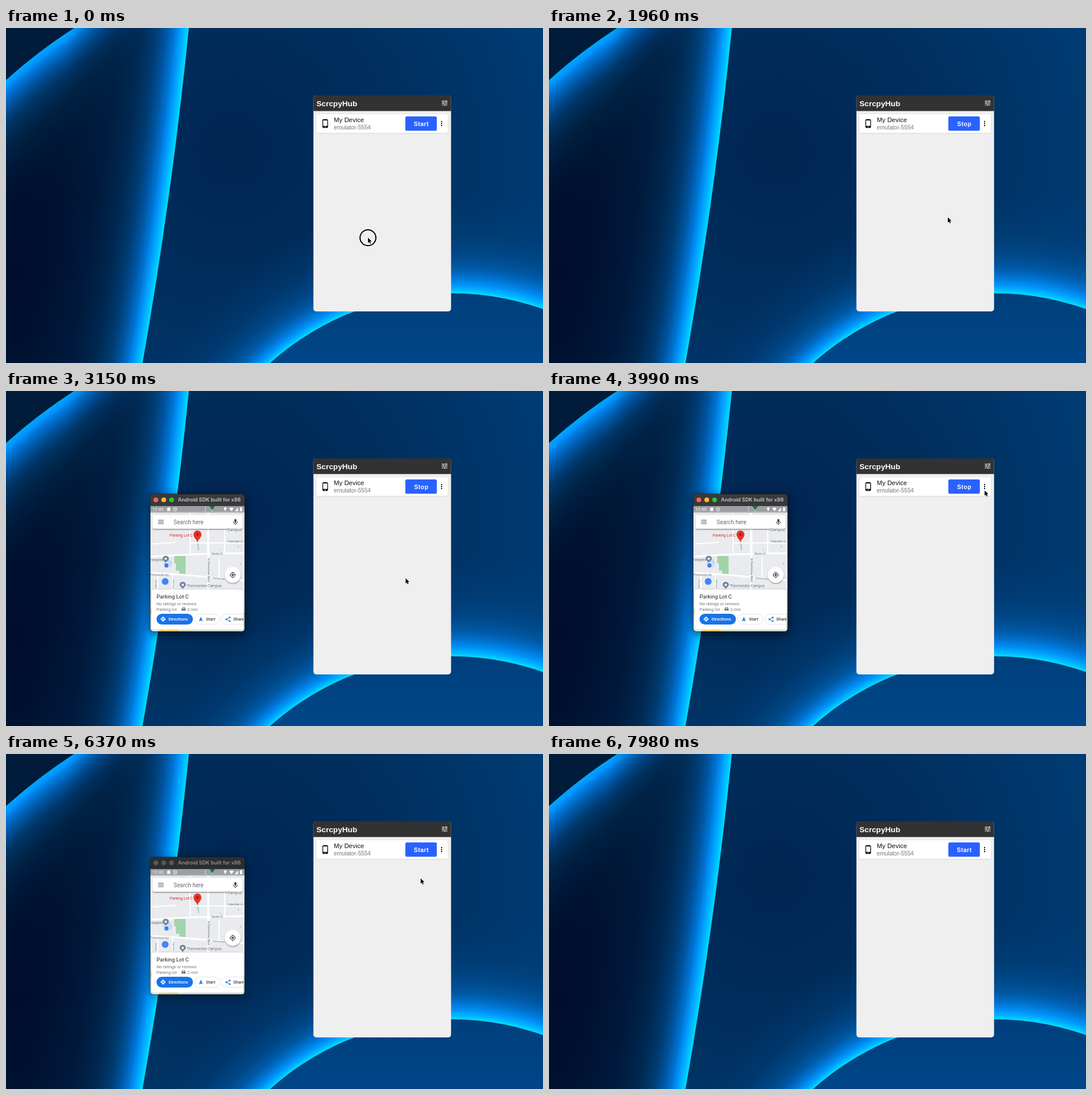
These frames come from a looping animation (948x591 px, 8.54 s). An HTML page:

```html
<!DOCTYPE html>
<html lang="en">
<head>
<meta charset="utf-8">
<title>ScrcpyHub</title>
<style>
html, body { margin: 0; width: 100%; height: 100%; overflow: hidden; background: #002a55; }
svg { display: block; width: 100%; height: 100%; }
.ui { font-family: "Liberation Sans", Arial, sans-serif; }
.map { font-family: Roboto, sans-serif; }
.label { paint-order: stroke; stroke: #f3f4f5; stroke-width: 1.2px; fill: #5f6b75; }
</style>
</head>
<body>
<svg viewBox="0 0 948 591" preserveAspectRatio="none">
  <defs>
    <radialGradient id="sky" gradientUnits="userSpaceOnUse" cx="400" cy="215" r="640">
      <stop offset="0" stop-color="#002552"/><stop offset=".45" stop-color="#002f5e"/><stop offset="1" stop-color="#003e78"/>
    </radialGradient>
    <radialGradient id="leaf" gradientUnits="userSpaceOnUse" cx="20" cy="430" r="440">
      <stop offset="0" stop-color="#000e2e"/><stop offset=".4" stop-color="#001231"/><stop offset="1" stop-color="#00223f"/>
    </radialGradient>
    <linearGradient id="dome" x1="0" y1="0" x2="0" y2="1">
      <stop offset="0" stop-color="#003f7c"/><stop offset=".15" stop-color="#00478a"/>
    </linearGradient>
    <clipPath id="leafClip"><circle cx="-7731.6" cy="-813.7" r="8095.4"/></clipPath>
    <clipPath id="phoneClip"><rect x="255" y="182" width="166" height="242" rx="5"/></clipPath>
    <clipPath id="sheetClip"><rect x="257" y="350" width="162" height="71" rx="4"/></clipPath>
    <filter id="blur" x="-50%" y="-50%" width="200%" height="200%"><feGaussianBlur stdDeviation="9"/></filter>
    <filter id="soft" x="-20%" y="-50%" width="140%" height="200%"><feGaussianBlur stdDeviation="1"/></filter>
  </defs>

  <g id="wallpaper">
    <rect width="948" height="591" fill="url(#sky)"/>
    <g clip-path="url(#leafClip)">
      <rect width="340" height="591" fill="url(#leaf)"/>
      <circle id="rim" cx="637" cy="798" r="951"/>
      <path d="M0 0H330V591H0Z" id="edge"/>
      <path d="M0 0H120A951 951 0 0 0 0 91.500Z" fill="#001c3a"/>
    </g>
    <rect id="halo" y="250" x="250" width="698" height="341"/>
    <circle cx="787" cy="948" r="480" fill="url(#dome)"/>
  </g>

  <g id="phone">
    <rect id="shadow" x="255" y="186" width="166" height="242" rx="8" filter="url(#blur)"/>
    <rect x="254.5" y="181.5" width="167" height="243" rx="5.5" fill="#14181d"/>
    <g clip-path="url(#phoneClip)" class="map">
      <rect id="bar" x="255" y="182" width="166" height="21.5"/>
      <g id="lights"><circle cx="264.5" cy="192"/><circle cx="278.5" cy="192"/><circle cx="292.3" cy="192"/></g>
      <text id="caption" x="359" y="195.3" font-size="8.95" font-weight="700" text-anchor="middle" font-family="Inter, sans-serif">Android SDK built for x86</text>

      <rect x="255" y="203" width="166" height="221" fill="#e9ebee"/>
      <path d="M297 291H317V324H306V317H300V304H297Z" fill="#a3d3ab"/>
      <path d="M338 265L340 281" stroke="#a8d8b0" stroke-width="2.5"/>
      <g fill="none" stroke="#fff" stroke-width="2">
        <path d="M255 292L330 288L421 286" stroke-width="3"/>
        <path d="M255 321L310 324L421 334" stroke-width="3"/>
        <path d="M357 203V350" stroke-width="4"/>
        <path d="M325 213V290M325 268H421M386 244V286M255 270L300 267M294 325V350M268 325V350M376 292V330"/>
      </g>
      <path d="M379 282V280M410 276V273M414 306V303" stroke="#9aa0a6"/>

      <rect x="255" y="203" width="166" height="11" fill="#9b9fa3"/>
      <path d="M352 203V214H364V203M255 214H421" fill="none" stroke="#b8bcc0" stroke-width="2"/>
      <path d="M359 203H369L364 210Z" fill="#187544"/>
      <text x="258" y="211.3" font-size="8" fill="#fff">12:40</text>
      <g fill="#fff">
        <path d="M286 205.500H290V211.500H284.500V207Z"/>
        <circle cx="298.500" cy="208.500" r="3" fill="none" stroke="#fff"/><path d="M297 207L300 210" stroke="#fff"/>
        <path d="M387 212L384.800 208A2.300 2.300 0 1 1 389.200 208Z"/>
        <path d="M398 212L394 207Q398 203.800 402 207Z"/><path d="M404 212H409.500V205.500Z"/>
        <path d="M413 206H414V205H416V206H417V212H413Z"/>
      </g>
      <rect x="259" y="219.500" width="159" height="25" rx="3" fill="#0006" filter="url(#soft)"/>
      <rect x="258.500" y="218.500" width="159.500" height="24.500" rx="3" fill="#fff"/>
      <path d="M268.500 228H278.500M268.500 231H278.500M268.500 234H278.500" stroke="#444" stroke-width="1.200"/>
      <text x="296" y="234.500" font-size="10" fill="#666a6e">Search here</text>
      <rect x="403.200" y="225.800" width="3.600" height="6.600" rx="1.800" fill="#444"/>
      <path d="M401.300 230.500A3.700 3.700 0 0 0 408.700 230.500M405 234.200V236.500" fill="none" stroke="#444" stroke-width="1.100"/>

      <g class="label" font-size="6.800">
        <text x="391" y="247">Campus</text>
        <text x="254" y="300">rowplex</text>
        <text x="319" y="346">Thornwicke Campus</text>
        <g font-size="5">
          <text x="254" y="325.500" transform="rotate(2 254 325)">Thornwicke Rd</text>
          <text x="364" y="331.500" font-size="4.300" transform="rotate(4 364 331)">Thornwicke Rd</text>
          <text x="363" y="289" font-size="4.600">Birchin Ct</text>
          <text x="391" y="266.500" font-size="4.600">Oakendale Ln</text>
          <text transform="translate(355.500 295) rotate(90)" font-size="5.400">N Elmhollow Blvd</text>
          <text transform="translate(266 347) rotate(-90)" font-size="4">Alta Ave</text>
          <text transform="translate(297 347) rotate(-90)" font-size="4">Pine Ave</text>
        </g>
      </g>
      <text class="label" x="289" y="256.500" font-size="6.800" style="fill:#c5221f">Parking Lot C</text>
      <path d="M338 267C337 262 331 259 331 253A7 7 0 0 1 345 253C345 259 339 262 338 267Z" fill="#e53529"/>
      <circle cx="338" cy="253" r="2.500" fill="#a31d14"/>
      <g id="pins"></g>
      <circle cx="285.500" cy="304" r="8" fill="#4285f4" opacity=".18"/>
      <circle cx="283.300" cy="307.700" r="4.500" fill="#3b80f0" stroke="#fff" stroke-width="1.200"/>
      <circle cx="281" cy="336" r="6" fill="#4285f4"/>

      <circle cx="400.500" cy="326" r="14" fill="#0006" filter="url(#soft)"/>
      <circle cx="400.300" cy="324.500" r="14.200" fill="#fff"/>
      <g fill="none" stroke="#444" stroke-width="1.100">
        <circle cx="400.300" cy="324.500" r="3.900"/>
        <path d="M400.300 319V321M400.300 328V330M394.800 324.500H396.800M403.800 324.500H405.800"/>
      </g>
      <circle cx="400.300" cy="324.500" r="2" fill="#444"/>

      <path d="M255 384L258 387V398L255 392M268 424Q273 419 280 422L302 420L306 424Z" fill="#f3d06b"/>
      <path d="M306 422H421V424H306ZM419 392H421V420H419Z" fill="#c5e2ca"/>
      <rect x="257" y="350" width="162" height="71" rx="4" fill="#0004" filter="url(#soft)"/>
      <g clip-path="url(#sheetClip)">
        <rect x="257" y="350" width="162" height="71" fill="#fff"/>
        <text x="265.700" y="366.300" font-size="9.600" fill="#202124">Parking Lot C</text>
        <g font-size="7.500" fill="#70757a">
          <text x="265.700" y="377.500">No ratings or reviews</text>
          <text x="265.700" y="387.800">Parking lot ·</text>
          <text x="320" y="387.800">2 min</text>
          <path d="M310 388V384.500L311.300 381.500H315.700L317 384.500V388H315.500V387H311.500V388ZM311.500 384H315.500L314.900 382.500H312.100Z" fill-rule="evenodd"/>
        </g>
        <rect x="265.700" y="393" width="64.300" height="19" rx="9.500" fill="#1a73e8"/>
        <g fill="#fff" stroke="#dadce0" stroke-width=".8">
          <rect x="333" y="393.400" width="44.500" height="18.200" rx="9.100"/>
          <rect x="380.500" y="393.400" width="60" height="18.200" rx="9.100"/>
        </g>
        <path d="M277.300 397.700L282 402.400L277.300 407.100L272.600 402.400Z" fill="#fff"/>
        <path d="M275.700 404.500V402H278.500M277.500 400.500L279.200 402L277.500 403.500" stroke="#1a73e8" fill="none"/>
        <path d="M344 398L347.500 406.500L344 405L340.500 406.500Z" fill="#3b78e7"/>
        <path d="M395 399.500L389 402.700L395 406" fill="none" stroke="#1a73e8"/>
        <g fill="#1a73e8"><circle cx="395" cy="399.400" r="1.500"/><circle cx="389" cy="402.700" r="1.500"/><circle cx="395" cy="406" r="1.500"/></g>
        <g font-size="7.500" font-weight="500" fill="#3c4043">
          <text x="287" y="405" fill="#fff">Directions</text>
          <text x="353" y="405">Start</text>
          <text x="401" y="405">Share</text>
        </g>
      </g>
    </g>
  </g>

  <g id="hub" class="ui">
    <rect x="542.700" y="119" width="243" height="381" rx="5" fill="#efefef"/>
    <path d="M542.700 146.500V124A5 5 0 0 1 547.700 119H780.700A5 5 0 0 1 785.700 124V146.500Z" fill="#323232"/>
    <text x="548" y="138" font-size="13.650" font-weight="700" fill="#fff">ScrcpyHub</text>
    <path transform="translate(767.800 125.800) scale(.55)" fill="#fff" d="M3 17v2h6v-2H3zM3 5v2h10V5H3zm10 16v-2h8v-2h-8v-2h-2v6h2zM7 9v2H3v2h4v2h2V9H7zm14 4v-2H11v2h10zm-6-4h2V7h4V5h-4V3h-2v6z"/>
    <rect x="548" y="152.300" width="232" height="33.200" rx="3" fill="#0002" filter="url(#soft)"/>
    <rect x="548" y="152" width="232" height="33" rx="3" fill="#fff"/>
    <path transform="translate(555.100 160.200) scale(.7)" d="M16 1H8C6.340 1 5 2.340 5 4v16c0 1.660 1.340 3 3 3h8c1.660 0 3-1.340 3-3V4c0-1.660-1.340-3-3-3zm-2 20h-4v-1h4v1zm3.250-3H6.750V4h10.500v14z"/>
    <text x="578.800" y="166.300" font-size="11.400" fill="#111">My Device</text>
    <text x="578.800" y="179" font-size="10.100" fill="#777">emulator-5554</text>
    <rect id="button" x="705" y="156" width="55.600" height="25.300" rx="2.500"/>
    <text id="action" x="733.200" y="172.700" font-size="10.500" font-weight="700" letter-spacing=".5" text-anchor="middle" fill="#fff"></text>
    <circle cx="769" cy="165.200" r="1.150"/><circle cx="769" cy="168.700" r="1.150"/><circle cx="769" cy="172.200" r="1.150"/>
  </g>

  <g id="pointer">
    <circle id="ring" r="14" fill="none" stroke="#000" stroke-width="2"/>
    <path transform="scale(.9)" d="M0 0V10.200L2.400 8L4 11.600L5.800 10.800L4.200 7.300H7.400Z" stroke="#fff" stroke-width="1" paint-order="stroke" stroke-linejoin="round"/>
  </g>
</svg>
<script>
const LOOP = 8540, STEP = 70;
const NS = 'http://www.w3.org/2000/svg';
const $ = id => document.getElementById(id);

function add(parent, tag, attrs) {
  const el = document.createElementNS(NS, tag);
  for (const k in attrs) el.setAttribute(k, attrs[k]);
  return parent.appendChild(el);
}

// Glow that follows a circle; side is -1 inward, 1 outward; lean widens it to the right.
function glow(id, cx, cy, r, side, stops, lean = 0) {
  const reach = stops[stops.length - 1][0];
  const inner = side < 0 ? r - reach : r;
  const grad = add(document.querySelector('defs'), 'radialGradient', {
    id: id + 'Glow', gradientUnits: 'userSpaceOnUse', cx: cx + lean, cy, fx: cx, fy: cy,
    fr: inner, r: inner + reach
  });
  const list = side < 0 ? [...stops].reverse() : stops;
  for (const [d, color, alpha] of list) {
    add(grad, 'stop', {
      offset: side < 0 ? 1 - d / reach : d / reach,
      'stop-color': color, 'stop-opacity': alpha
    });
  }
  $(id).setAttribute('fill', `url(#${id}Glow)`);
}

glow('edge', -7731.6, -813.7, 8095.4, -1, [
  [0, '#00e0ff', 1], [5, '#00c4ff', 1], [14, '#009dff', 1], [26, '#0073d4', 1], [40, '#00549f', 1],
  [58, '#003d74', .95], [85, '#002b55', .85], [125, '#002045', .6], [210, '#001a3a', 0]
]);
glow('rim', 637, 798, 951, -1, [
  [0, '#00a8ff', 1], [8, '#0096ff', 1], [18, '#0078dc', 1], [34, '#0058a6', 1],
  [56, '#003c72', .9], [90, '#002a50', .6], [150, '#001f40', 0]
]);
glow('halo', 787, 948, 480, 1, [
  [0, '#00e0ff', 1], [6, '#00b8ff', 1], [16, '#0090f8', 1], [30, '#0070cc', 1], [46, '#005aa6', .95],
  [72, '#004a8c', .8], [110, '#00407c', .5], [180, '#003a70', 0]
], 45);

for (const [x, y] of [[282, 296], [312, 342]]) {
  add($('pins'), 'path', {
    d: `M${x} ${y + 8}C${x - 1} ${y + 4} ${x - 5.5} ${y + 3} ${x - 5.5} ${y}a5.500 5.500 0 0 1 11 0C${x + 5.5} ${y + 3} ${x + 1} ${y + 4} ${x} ${y + 8}Z`,
    fill: '#73879b'
  });
  add($('pins'), 'circle', { cx: x, cy: y, r: 2, fill: '#fff' });
}

// Pointer moves: start, end, x, y
const moves = [
  [70, 700, 736, 171],
  [980, 1400, 704, 334],
  [2800, 2870, 705.5, 330.5],
  [3150, 3780, 769, 175.5],
  [3990, 4200, 764, 174],
  [4410, 4970, 743, 167],
  [5390, 5740, 732, 219.5],
  [7000, 7700, 742, 612]
];
const presses = [[0, 140], [770, 910], [5180, 5320]];

const within = (t, a, b) => t >= a && t < b;
const ramp = (t, a, b) => Math.min(1, Math.max(0, (t - a) / (b - a)));
const ease = p => (1 - Math.cos(Math.PI * p)) / 2;

function pointerAt(t) {
  let x = 639, y = 370;
  for (const [a, b, tx, ty] of moves) {
    const p = ease(ramp(t, a, b));
    x += (tx - x) * p;
    y += (ty - y) * p;
  }
  return [x, y];
}

function render(t) {
  const [x, y] = pointerAt(t);
  $('pointer').setAttribute('transform', `translate(${x} ${y})`);
  $('pointer').style.display = t < 7700 ? '' : 'none';
  $('ring').style.display = presses.some(([a, b]) => within(t, a, b)) ? '' : 'none';

  const hover = within(x, 705, 761) && within(y, 156, 181);
  $('button').setAttribute('fill', hover ? '#3d70ff' : '#2962ff');
  $('action').textContent = within(t, 980, 5390) ? 'Stop' : 'Start';

  const opening = ease(ramp(t, 2100, 2310));
  const shown = opening * (1 - ramp(t, 6370, 6510));
  const scale = .92 + .08 * opening;
  $('phone').style.display = shown > 0 ? '' : 'none';
  $('phone').setAttribute('opacity', shown);
  $('phone').setAttribute('transform', `translate(338 303) scale(${scale}) translate(-338 -303)`);

  const active = t < 5180;
  $('bar').setAttribute('fill', active ? '#39393b' : '#2b2d2f');
  $('caption').setAttribute('fill', active ? '#b8b8b8' : '#858585');
  $('shadow').setAttribute('opacity', active ? .7 : .4);
  const colors = active ? ['#ff5f57', '#febc2e', '#28c840'] : Array(3).fill('#58585a');
  [...$('lights').children].forEach((dot, i) => {
    dot.setAttribute('r', 4.3);
    dot.setAttribute('fill', colors[i]);
  });
}

const start = performance.now();
function tick() {
  const t = (performance.now() - start) % LOOP;
  render(Math.floor(t / STEP) * STEP);
  requestAnimationFrame(tick);
}
render(0);
requestAnimationFrame(tick);
</script>
</body>
</html>
```
